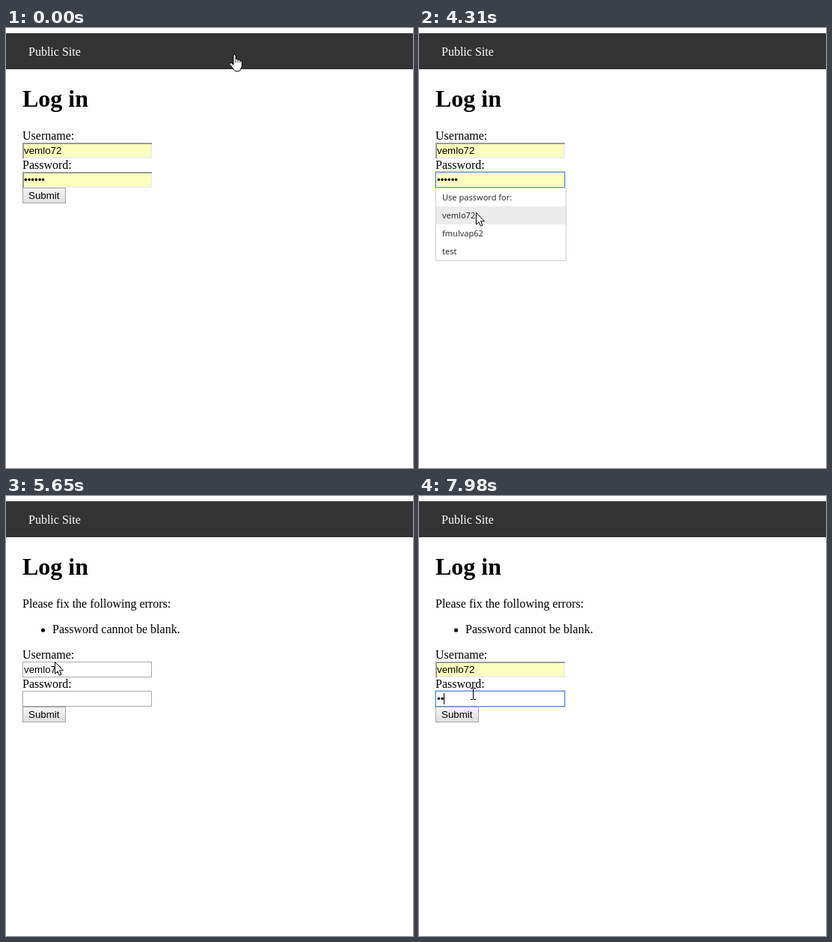
Animation of 544 by 587 pixels, one loop 8 s. Source, as an HTML page with a canvas:

```html
<!DOCTYPE html>
<html lang="en">
<head>
<meta charset="utf-8">
<title>Log in</title>
<style>
  html, body { margin: 0; width: 100%; height: 100%; overflow: hidden; background: #fefefe; }
  canvas { display: block; width: 544px; height: 587px; }
</style>
</head>
<body>
<canvas id="stage" width="544" height="587"></canvas>
<script>
const ctx = document.getElementById('stage').getContext('2d');
const LOOP = 8000;
const SERIF = '16px "Liberation Serif", serif';
const HEADING = 'bold 32px "Liberation Serif", serif';
const SANS = '13.333px "Liberation Sans", sans-serif';
const MENU = '11.1px "Open Sans", sans-serif';
const USER = 'vemlo72';
const MENU_ROWS = ['Use password for:', USER, 'fmulvap62', 'test'];
const YELLOW = '#faffbd';

// The pointer jumps from place to place: time, shape, x, y
const POINTER = [
  [0, hand, 298, 35], [130, arrow, 300, 68], [280, arrow, 133, 181],
  [430, arrow, 121, 184], [1110, arrow, 120, 189], [1260, arrow, 98, 207],
  [1380, arrow, 80, 222], [1530, arrow, 79, 223], [2370, arrow, 73, 214],
  [2530, beam, 64, 195], [4310, arrow, 76, 246], [4440, arrow, 86, 280],
  [4590, arrow, 95, 368], [4860, arrow, 82, 300], [4990, arrow, 67, 237],
  [5140, arrow, 66, 225], [5260, arrow, 65, 222], [5380, arrow, 65, 221],
  [6450, beam, 64, 216], [6570, beam, 64, 226], [6720, beam, 72, 256]
];

// Password field: time, bullets, filled yellow, focused, caret shown
const PASSWORD = [
  [0, 6, true, false, false], [3460, 6, true, true, true],
  [3610, 6, true, true, false], [4170, 0, false, true, true],
  [4310, 6, true, true, false], [4590, 0, false, true, true],
  [4740, 0, false, false, false], [5800, 6, true, false, false],
  [6970, 6, true, true, true], [7120, 6, true, true, false],
  [7830, 1, false, true, true], [7980, 2, false, true, true]
];

const latest = (steps, t) => steps.filter(step => step[0] <= t).pop();
const during = (t, from, to) => t >= from && t < to;

function box(x, y, w, h, color) {
  ctx.fillStyle = color;
  ctx.fillRect(x, y, w, h);
}

function outline(x, y, w, h, color) {
  ctx.strokeStyle = color;
  ctx.lineWidth = 1;
  ctx.strokeRect(x + .5, y + .5, w - 1, h - 1);
}

function text(string, x, y, font = SERIF, color = '#000') {
  ctx.font = font;
  ctx.fillStyle = color;
  ctx.fillText(string, x, y);
}

function shape(points, fill) {
  ctx.beginPath();
  points.forEach(([x, y]) => ctx.lineTo(x, y));
  ctx.closePath();
  ctx.lineJoin = 'round';
  ctx.lineWidth = 1;
  ctx.fillStyle = fill;
  ctx.strokeStyle = '#000';
  ctx.fill();
  ctx.stroke();
}

function arrow() {
  shape([[.5, .5], [.5, 16.2], [4, 12.8], [6.4, 18.3], [8.8, 17.3], [6.5, 11.8], [11.4, 11.8]], '#fff');
}

function hand() {
  shape([[6, 1.8], [7.5, .5], [9, 1.8], [9, 7], [10.5, 6.2], [12, 7.6], [13.5, 7], [15, 8.8],
    [16, 8.4], [17.4, 10], [17.4, 16], [15.4, 20], [14.5, 22], [11, 23], [7.5, 22],
    [5.5, 19], [1, 13.5], [1, 11.8], [3, 11.5], [6, 14]], '#fff');
  [9, 12, 15].forEach(x => box(x - .4, 7.5, .8, 4, '#000'));
}

function beam() {
  for (const y of [0, 15]) {
    box(-3, y, 3, 1, '#000');
    box(1, y, 3, 1, '#000');
  }
  box(0, 1, 1, 14, '#000');
}

function field(y, content, filled, focused, caret) {
  if (filled) {
    box(22, y, 173, 21, '#9a9a9a');
    box(24, y + 2, 171, 19, '#eee');
    box(24, y + 2, 169, 17, YELLOW);
  } else {
    box(22, y, 173, 21, '#fff');
    outline(22, y, 173, 21, '#a9a9a9');
  }
  if (focused) {
    if (filled) box(23, y + 1, 171, 19, YELLOW);
    outline(21, y - 1, 175, 23, '#a9c5f2');
    outline(22, y, 173, 21, '#6797df');
  }
  text(content, 24, y + 15, SANS);
  if (caret) box(24 + Math.floor(ctx.measureText(content).width), y + 3, 1, 15, '#000');
}

function button(y, hovered) {
  const shade = ctx.createLinearGradient(0, y, 0, y + 21);
  shade.addColorStop(0, hovered ? '#f8f8f8' : '#f5f5f5');
  shade.addColorStop(1, hovered ? '#dadada' : '#dedede');
  box(22, y, 58, 21, shade);
  outline(22, y, 58, 21, hovered ? '#707070' : '#a6a6a6');
  text('Submit', 30, y + 15, SANS);
}

function menu(y, selected) {
  box(22, y, 175, 98, '#fff');
  if (selected) box(23, y + 1 + selected * 24, 173, 24, '#ececec');
  outline(22, y, 175, 98, '#d0d0d0');
  MENU_ROWS.forEach((row, i) => text(row, 31, y + 17 + i * 24, MENU, '#222'));
}

function errors() {
  text('Please fix the following errors:', 22, 149);
  ctx.beginPath();
  ctx.arc(49.5, 179, 2.6, 0, 7);
  ctx.fill();
  text('Password cannot be blank.', 62, 183);
}

function draw(t) {
  const rejected = t >= 5650;
  const shift = rejected ? 68 : 0;
  const [, bullets, filled, focused, caret] = latest(PASSWORD, t);

  box(0, 0, 544, 587, '#fefefe');
  box(0, 7, 544, 48, '#333');
  text('Public Site', 30, 37, SERIF, '#fff');
  text('Log in', 22, 105, HEADING);
  if (rejected) errors();

  text('Username:', 22, 149 + shift);
  field(153 + shift, USER, !during(t, 5650, 5800));
  text('Password:', 22, 188 + shift);
  field(192 + shift, '•'.repeat(bullets), filled, focused, caret);
  button(213 + shift, during(t, 1530, 2530) || during(t, 5140, 5650));

  if (during(t, 3610, 4740) || during(t, 7120, 7830)) {
    const selected = during(t, 4310, 4440) ? 1 : during(t, 4440, 4590) ? 2 : 0;
    menu(213 + shift, selected);
  }

  const [, pointer, x, y] = latest(POINTER, t);
  ctx.save();
  ctx.translate(x, y);
  pointer();
  ctx.restore();
}

const start = performance.now();
function tick() {
  draw((performance.now() - start) % LOOP);
  requestAnimationFrame(tick);
}
tick();
</script>
</body>
</html>
```
